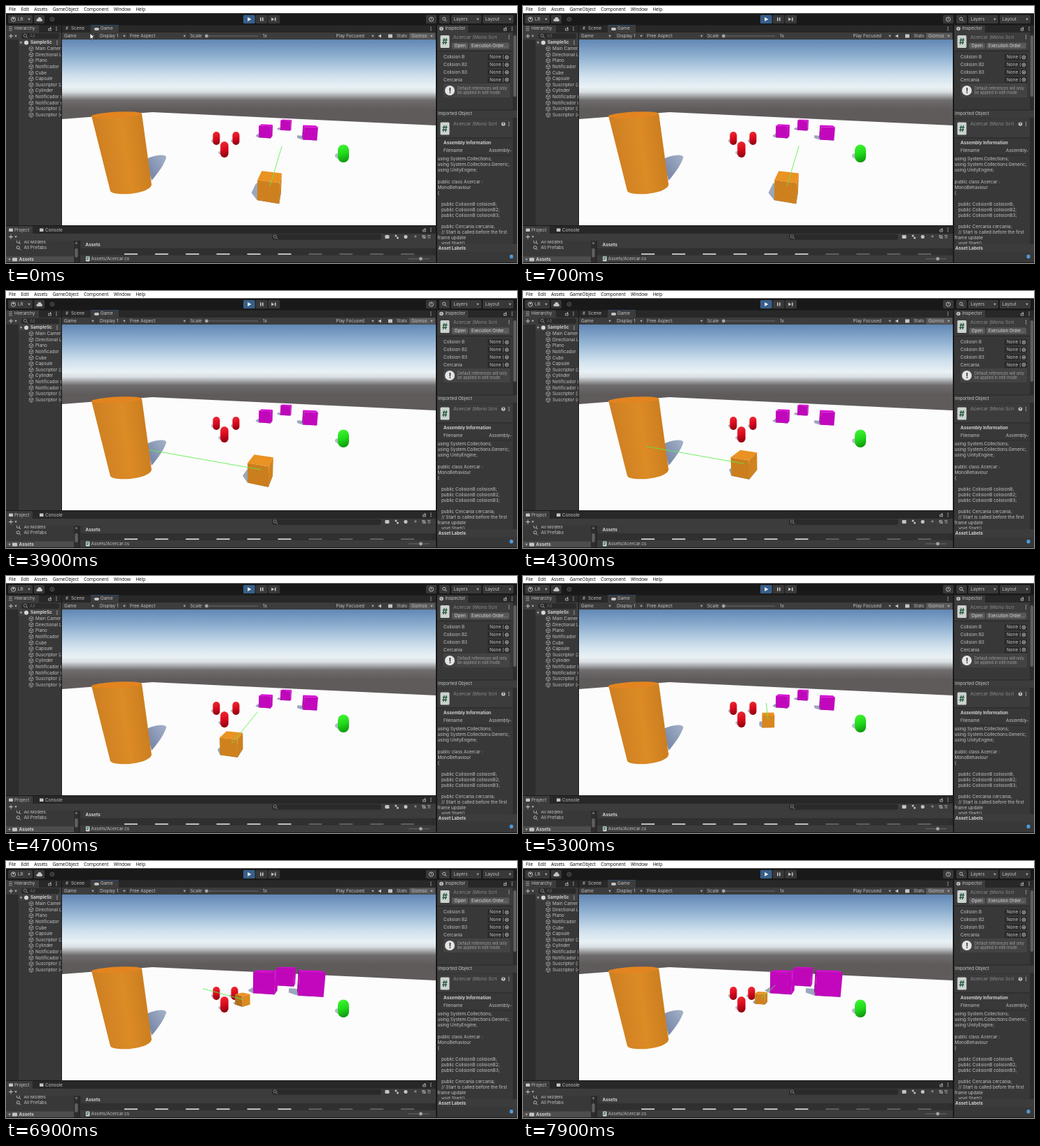
An HTML page with a canvas that plays this animation: 730x368 px, repeating every 8000 ms.

```html
<!DOCTYPE html>
<html lang="en">
<head>
<meta charset="utf-8">
<style>
  html, body { margin: 0; width: 100%; height: 100%; overflow: hidden; background: #191919; }
  canvas { display: block; }
</style>
</head>
<body>
<canvas width="730" height="368"></canvas>
<script>
const ctx = document.querySelector('canvas').getContext('2d');
const LOOP = 8000, STEP = 100;
const TEXT = '#c4c4c4', DIM = '#8d8d8d', PANEL = '#383838', BAR = '#3c3c3c', STRIP = '#282828', FIELD = '#2a2a2a', GAP = '#191919';

// ---------- drawing helpers ----------
function rect(color, x, y, w, h) {
  ctx.fillStyle = color;
  ctx.fillRect(x, y, w, h);
}
function pill(color, x, y, w, h, r = 1.5) {
  ctx.fillStyle = color;
  ctx.beginPath();
  ctx.roundRect(x, y, w, h, r);
  ctx.fill();
}
function text(str, x, y, color = TEXT, size = 6.4, weight = 400, family = 'Inter') {
  ctx.font = `${weight} ${size}px ${family}, sans-serif`;
  ctx.fillStyle = color;
  ctx.fillText(str, x, y);
}
const bold = (str, x, y) => text(str, x, y, '#d2d2d2', 6.3, 700);
function poly(color, points) {
  ctx.fillStyle = color;
  ctx.beginPath();
  points.forEach(p => ctx.lineTo(...p));
  ctx.fill();
}
function line(color, x1, y1, x2, y2, width = 1) {
  ctx.strokeStyle = color;
  ctx.lineWidth = width;
  ctx.beginPath();
  ctx.moveTo(x1, y1);
  ctx.lineTo(x2, y2);
  ctx.stroke();
}
function dot(color, x, y, r) {
  ctx.fillStyle = color;
  ctx.beginPath();
  ctx.arc(x, y, r, 0, 7);
  ctx.fill();
}
function ring(x, y, r, color = TEXT) {
  ctx.strokeStyle = color;
  ctx.lineWidth = 0.9;
  ctx.beginPath();
  ctx.arc(x, y, r, 0, 7);
  ctx.stroke();
}
function gradient(x1, y1, x2, y2, stops) {
  const g = ctx.createLinearGradient(x1, y1, x2, y2);
  stops.forEach(([at, color]) => g.addColorStop(at, color));
  return g;
}
function triangle(x, y, r, angle, color = TEXT) {
  poly(color, [0, 1, 2].map(i => angle + i * Math.PI * 2 / 3).map(a => [x + r * Math.cos(a), y + r * Math.sin(a)]));
}
const caret = (x, y) => triangle(x, y - 0.3, 2, Math.PI / 2, '#b0b0b0');
const kebab = (x, y) => [-2.3, 0, 2.3].forEach(d => dot(TEXT, x, y + d, 0.7));
function plus(x, y) {
  line(TEXT, x - 3, y, x + 3, y);
  line(TEXT, x, y - 3, x, y + 3);
  caret(x + 7, y);
}
function lens(x, y, color = TEXT) {
  ring(x - 0.7, y - 0.7, 2.1, color);
  line(color, x + 1, y + 1, x + 3, y + 3);
}
function lock(x, y) {
  ctx.strokeStyle = TEXT;
  ctx.lineWidth = 0.8;
  ctx.strokeRect(x - 1.7, y - 0.3, 3.4, 2.8);
  line(TEXT, x + 1.2, y, x + 1.2, y - 2.5);
}
function cubeIcon(x, y) {
  const corner = i => [x + 3.3 * Math.sin(i * Math.PI / 3), y - 3.3 * Math.cos(i * Math.PI / 3)];
  ctx.strokeStyle = '#b5b5b5';
  ctx.lineWidth = 0.7;
  ctx.beginPath();
  for (let i = 0; i <= 6; i++) ctx.lineTo(...corner(i));
  for (let i = 1; i < 6; i += 2) { ctx.moveTo(x, y); ctx.lineTo(...corner(i)); }
  ctx.stroke();
}
function scriptIcon(x, y) {
  pill('#ccd3cf', x, y, 13, 18);
  text('#', x + 2.6, y + 9.5, '#23553c', 12, 700);
}
function slider(x, y, w, knob) {
  line('#6a6a6a', x, y, x + w, y);
  dot('#a5a5a5', x + knob, y, 2.4);
}
function dropdown(label, x, w) {
  pill(PANEL, x, 13, w, 12);
  text(label, x + 3.5, 19);
  caret(x + w - 5, 19);
}

// ---------- 3D scene ----------
const CAM = { x: 347, y: 181, focal: 230, height: 4.47, cos: 0.982, sin: 0.188 };
const LIGHT = [0.32, 0.77, -0.56];

function project([x, y, z]) {
  const drop = CAM.height - y;
  const k = CAM.focal / (z * CAM.cos + drop * CAM.sin);
  return [CAM.x + x * k, CAM.y + (drop * CAM.cos - z * CAM.sin) * k];
}
const shadowOf = ([x, y, z]) => project([x - y * 0.25, 0, z + y * 0.6]);
const dotProduct = (a, b) => a.reduce((sum, v, i) => sum + v * b[i], 0);

function cube(rgb, x, z, size, yaw) {
  const half = size / 2, c = Math.cos(yaw) * half, s = Math.sin(yaw) * half;
  const axes = [[c, 0, -s], [0, half, 0], [s, 0, c]];
  const centre = [x, half, z], eye = [0, CAM.height, 0];
  const faces = [0, 1, 2].flatMap(a => [-1, 1].map(sign => {
    const normal = axes[a].map(v => v * sign), u = axes[(a + 1) % 3], v = axes[(a + 2) % 3];
    const middle = centre.map((p, i) => p + normal[i]);
    const corners = [[-1, -1], [1, -1], [1, 1], [-1, 1]].map(([p, q]) => middle.map((m, i) => m + p * u[i] + q * v[i]));
    return { normal, middle, corners };
  }));
  for (const f of faces) poly('#9aa7bd', f.corners.map(shadowOf));
  for (const { normal, middle, corners } of faces) {
    if (dotProduct(normal, eye.map((e, i) => e - middle[i])) <= 0) continue;
    const shade = 0.7 + 0.38 * Math.max(0, dotProduct(normal, LIGHT) / half);
    poly(`rgb(${rgb.map(v => v * shade)})`, corners.map(project));
  }
}
function capsule(x, top, w, h, light, mid, dark) {
  ctx.lineCap = 'round';
  line('#b3bccb', x - 1, top + h - w / 3, x - w * 0.55, top + h - w * 0.6, w * 0.4);
  ctx.lineCap = 'butt';
  pill(gradient(x - w * 0.3, top, x + w * 0.3, top + h, [[0, light], [0.5, mid], [1, dark]]), x - w / 2, top, w, h, w / 2);
}
function cylinder() {
  ctx.fillStyle = gradient(205, 235, 230, 218, [[0, '#7c8bab'], [1, '#a3b1c8']]);
  ctx.beginPath();
  ctx.moveTo(200, 219);
  ctx.bezierCurveTo(213, 213, 229, 211, 229, 217);
  ctx.quadraticCurveTo(225, 230, 208, 250);
  ctx.fill();
  ctx.fillStyle = gradient(133, 215, 209, 205, [[0, '#cf8022'], [0.5, '#dc8b25'], [1, '#c87b1e']]);
  ctx.beginPath();
  ctx.moveTo(122, 157);
  ctx.lineTo(149, 265);
  ctx.bezierCurveTo(154, 273, 204, 270, 208, 256);
  ctx.lineTo(194, 154);
  ctx.fill();
  ctx.fillStyle = '#e2841f';
  ctx.beginPath();
  ctx.ellipse(158, 156, 36, 4.4, -0.05, 0, 7);
  ctx.fill();
}

// The player alternately turns to a heading and walks straight ahead
const turn = (from, to, heading) => ({ from, to, heading });
const walk = (from, to, distance) => ({ from, to, distance });
const MOVES = [
  turn(2800, 3100, -1.227), walk(3800, 4300, 2.25),
  turn(4300, 4500, 0.248), walk(4500, 4700, 0.65), walk(4700, 5200, 4.65),
  turn(5200, 5450, -0.42), walk(5700, 6000, 1.92), turn(6000, 6200, 0.24),
  turn(6300, 6600, -1.3), turn(6800, 7100, 0.247), walk(7200, 7600, 0.6)
];
const ramp = (t, from, to) => Math.min(1, Math.max(0, (t - from) / (to - from)));

function poseAt(t) {
  let x = 1, z = 7.05, heading = 0.275;
  for (const move of MOVES) {
    const k = ramp(t, move.from, move.to);
    if (move.distance) {
      x += Math.sin(heading) * move.distance * k;
      z += Math.cos(heading) * move.distance * k;
    } else {
      heading += (move.heading - heading) * k;
    }
  }
  return { x, z, heading };
}

function scene(t) {
  rect(gradient(0, 48, 0, 148, [[0, '#6187b4'], [0.27, '#95b5d4'], [0.52, '#cfe0ec'], [0.68, '#e9f1f5'],
    [0.75, '#d8dee1'], [0.81, '#a3a5a7'], [0.87, '#6f6c6d'], [1, '#605b5b']]), 80, 48, 534, 266);
  poly('#fcfcfc', [[80, 162], [209, 152], [614, 171], [614, 314], [80, 314]]);
  cylinder();

  const scale = 1 + 0.77 * ramp(t, 6500, 6900);
  const magenta = [222, 8, 216];
  cube(magenta, 6, 25.8, 1.55 * scale, 0.35);
  cube(magenta, 2.18, 20.4, 1.5 * scale, 0.3);
  cube(magenta, 7.4, 19.25, 1.55 * scale, 0.25);

  const red = ['#f02a35', '#d80a1c', '#85000f'];
  capsule(300.5, 180, 10, 19, ...red);
  capsule(328.5 - 2 * ramp(t, 6600, 6700), 180, 10, 19, ...red);
  capsule(312, 194, 11.5, 23, ...red);
  capsule(482, 198.5, 16, 25.5, '#42f535', '#20da1a', '#0c8f0c');

  const { x, z, heading } = poseAt(t), reach = 7.4;
  cube([236, 147, 34], x, z, 1, heading);
  const tip = project([x + reach * Math.sin(heading), 0.5, z + reach * Math.cos(heading)]);
  line('rgba(88,240,72,.85)', ...project([x, 0.5, z]), ...tip);
}

// ---------- editor panels ----------
function topBars() {
  rect('#fff', 0, 0, 730, 10.5);
  let x = 4;
  for (const name of ['File', 'Edit', 'Assets', 'GameObject', 'Component', 'Window', 'Help']) {
    text(name, x, 5.5, '#000', 6.4, 500, 'Open Sans');
    x += ctx.measureText(name).width + 7.4;
  }
  rect(GAP, 0, 10.5, 730, 17);
  dropdown('', 3, 35);
  ring(10.5, 19, 3.2);
  dot(TEXT, 10.5, 18, 1.3);
  text('LR', 17, 19);
  pill(PANEL, 40, 13, 15, 12);
  pill(TEXT, 43.5, 18.5, 8.5, 3.5, 1.7);
  dot(TEXT, 48, 18.5, 2.6);
  ring(66, 19, 2.8, '#666');
  dot('#666', 66, 19, 1);
  ['#375f8a', PANEL, PANEL].forEach((color, i) => pill(color, 339 + i * 17.7, 13, 16.7, 12));
  triangle(347, 19, 3.5, 0, '#eee');
  rect(TEXT, 363, 16.5, 1.6, 5);
  rect(TEXT, 366, 16.5, 1.6, 5);
  triangle(380.5, 19, 2.8, 0);
  rect(TEXT, 384, 16.5, 1.5, 5);
  pill(PANEL, 600, 13, 15, 12);
  ring(607.5, 19, 3);
  line(TEXT, 607.5, 17, 607.5, 19.5, 0.8);
  pill(PANEL, 619, 13, 15, 12);
  lens(626.5, 19);
  dropdown('Layers', 636, 43);
  dropdown('Layout', 681, 44);
}

const OBJECTS = ['Main Camera', 'Directional Light', 'Plano', 'Notificador', 'Cube', 'Capsule', 'Suscriptor (2)', 'Cylinder',
  'Notificador (2)', 'Notificador (3)', 'Suscriptor (3)', 'Suscriptor (4)'];

function hierarchy() {
  rect(PANEL, 0, 27, 80, 287);
  rect(STRIP, 0, 27, 80, 11);
  rect(BAR, 0, 27, 47, 11);
  rect(BAR, 0, 38, 80, 10);
  [30, 32.5, 35].forEach(y => line(TEXT, 4, y, 9, y, 0.7));
  text('Hierarchy', 12, 32.5);
  lock(62.5, 32.5);
  kebab(72, 32.5);
  plus(7, 43);
  pill(FIELD, 22, 39, 54, 8, 3);
  lens(28, 43, DIM);
  text('All', 34, 43, '#666');
  rect('#2d2d2d', 0, 48, 18, 266);
  rect('#404040', 18, 48, 62, 8.5);
  caret(21.5, 52.5);
  dot('#d8d8d8', 29, 52.5, 3);
  bold('SampleSc', 35, 52.5);
  kebab(73, 52.5);
  OBJECTS.forEach((name, i) => {
    const y = 61.2 + i * 8.62;
    cubeIcon(36, y);
    text(name, 42, y);
  });
  rect(GAP, 79, 27, 1.2, 287);
}

function gameBar() {
  rect(STRIP, 80, 27, 534, 11);
  rect(BAR, 121, 27, 40, 11);
  rect('#3a79bb', 121, 27, 40, 1);
  rect(BAR, 80, 38, 534, 10);
  text('#', 85, 32.5);
  text('Scene', 93, 32.5);
  pill(TEXT, 126, 31, 7, 4, 2);
  text('Game', 135, 32.5);
  kebab(607, 32.5);
  const label = (name, x, caretX) => {
    text(name, x, 43);
    if (!caretX) return;
    caret(caretX, 43);
    rect('#2b2b2b', caretX + 4.5, 38, 0.8, 10);
  };
  label('Game', 83, 124);
  label('Display 1', 134, 169);
  label('Free Aspect', 177, 255);
  label('Scale', 263);
  label('1x', 367);
  label('Play Focused', 471.5, 524);
  label('Stats', 558);
  slider(286, 43, 74, 0.5);
  triangle(534.5, 43, 3, Math.PI);
  rect(TEXT, 546, 40.5, 6, 5);
  rect('#585858', 576, 38.5, 37, 9);
  label('Gizmos', 579);
  caret(608, 43);
}

const CODE = `using System.Collections;
using System.Collections.Generic;
using UnityEngine;

public class Acercar :
MonoBehaviour
{

   public ColisionB colisionB;
   public ColisionB colisionB2;
   public ColisionB colisionB3;

   public Cercania cercania;
   // Start is called before the first
frame update
   void Start()`.split('\n');

function scriptHeader(y) {
  rect(BAR, 616, y, 108, 26);
  scriptIcon(620.5, y + 4);
  text('Acercar (Mono Scri', 639, y + 6.5, DIM, 6.8);
  kebab(718.5, y + 6.5);
}
function inspector() {
  rect(GAP, 614, 27, 2, 341);
  rect(PANEL, 616, 27, 114, 341);
  rect(STRIP, 616, 27, 114, 11);
  rect(BAR, 616, 27, 44, 11);
  dot(TEXT, 622, 32.5, 2.8);
  text('i', 621.2, 32.5, '#222', 5, 700);
  text('Inspector', 627.5, 32.5);
  lock(713, 32.5);
  kebab(723, 32.5);

  scriptHeader(38);
  pill('#585858', 637, 52.5, 23, 9);
  text('Open', 640.5, 57, '#ddd');
  pill('#585858', 662, 52.5, 57, 9);
  text('Execution Order...', 665, 57, '#ddd', 6.1);
  ['Colision B', 'Colision B2', 'Colision B3', 'Cercania'].forEach((name, i) => {
    const y = 73.5 + i * 10.7;
    text(name, 625, y);
    pill(FIELD, 688, y - 4.3, 32, 8.6);
    text('None (', 691, y);
    ring(715.5, y, 2.4);
    dot(TEXT, 715.5, y, 1);
  });
  pill('#434343', 625, 111, 95, 20);
  dot('#e4e4e4', 634, 121, 7);
  text('!', 632.4, 121.2, '#333', 11, 700);
  text('Default references will only', 645, 118.3, '#a0a0a0', 5.5);
  text('be applied in edit mode.', 645, 124.8, '#a0a0a0', 5.5);
  rect('#2d2d2d', 724, 38, 6, 303);
  pill('#5f5f5f', 724.7, 42, 4.3, 88, 2);

  rect(BAR, 616, 149.5, 114, 10.5);
  text('Imported Object', 617, 154.5);
  scriptHeader(162.5);
  dot(TEXT, 710.5, 169, 2.8);
  text('?', 709, 169.3, '#222', 5, 700);
  [64, 148.5, 188.5].forEach(y => rect('#242424', 616, y, 108, 0.8));
  bold('Assembly Information', 625, 196.3);
  text('Filename', 625, 206.7);
  text('Assembly-', 690, 206.7);
  rect('#2b2b2b', 616, 213.5, 108, 0.8);
  CODE.forEach((s, i) => text(s, 616.5, 219.3 + i * 8.08));
  rect(BAR, 616, 341, 114, 11);
  bold('Asset Labels', 617.5, 346.8);
  rect(PANEL, 616, 352, 114, 15);
  pill('#4c9bdc', 719.5, 356, 5, 5.5, 2);
}

function projectPanel() {
  rect(PANEL, 0, 314, 614, 54);
  rect(GAP, 0, 314, 614, 1.2);
  rect(STRIP, 0, 315, 614, 11);
  rect(BAR, 0, 315, 38, 11);
  rect(BAR, 0, 326, 614, 10);
  pill(TEXT, 4, 318.5, 6, 4.5, 1);
  text('Project', 12, 321);
  rect(TEXT, 48, 318.5, 5.5, 4.5);
  text('Console', 56, 321);
  lock(597.5, 320.5);
  kebab(607, 320.5);
  ['All Models', 'All Prefabs'].forEach((name, i) => {
    lens(18, 338 + i * 8.5);
    text(name, 25.5, 338 + i * 8.5);
  });
  rect(BAR, 0, 326, 97, 10);
  plus(7, 330.5);
  rect('#4d4d4d', 0, 358.5, 97, 8.5);
  caret(5, 363);
  pill(TEXT, 9, 360.5, 7, 5, 1);
  bold('Assets', 18.5, 363);
  rect('#2d2d2d', 97, 336, 7, 31);
  triangle(100.5, 339.5, 2, -Math.PI / 2, '#888');
  pill('#5f5f5f', 98.3, 347, 4.4, 13, 2);
  rect(GAP, 104.5, 336, 1, 31);
  rect(BAR, 110, 336.5, 504, 10);
  bold('Assets', 113.5, 341.8);
  rect('#303030', 106, 347, 508, 10);
  for (let i = 0; i < 10; i++) rect(i < 6 ? '#e6e6e6' : '#6d6d6d', 169 + i * 43.9, 354.5, 19, 1.6);
  rect('#2d2d2d', 608, 347, 6, 10);
  rect(BAR, 106, 357, 508, 10);
  pill('#d8dedb', 114, 358.5, 5.5, 7, 1);
  text('#', 114.6, 362, '#23704a', 6, 700);
  text('Assets/Acercar.cs', 121.5, 362.2);
  slider(575, 362, 30, 17.5);
  pill(FIELD, 380, 326.8, 156, 8, 3);
  lens(385, 330.7, DIM);
  pill(TEXT, 541.5, 328, 6, 5, 1);
  dot(TEXT, 557, 329, 1.5);
  dot(TEXT, 559.5, 332, 1.5);
  pill(TEXT, 568.5, 328, 5, 5, 2);
  text('★', 582, 330.7, DIM, 6.5, 400, 'DejaVu Sans');
  ring(597, 330.5, 2);
  line(TEXT, 594, 328, 600, 333, 0.8);
  text('11', 601.5, 330.7);
  rect(GAP, 0, 367, 730, 1);
}

function cursor(t) {
  if (t >= 700) return;
  const k = ramp(t, 0, 600);
  ctx.save();
  ctx.translate(120 + 514 * k, 39 + 306 * k);
  poly('#fff', [[0, 0], [0, 8.5], [2, 6.7], [3.3, 9.5], [4.6, 8.9], [3.4, 6.2], [6, 6]]);
  ctx.closePath();
  ctx.strokeStyle = '#111';
  ctx.lineWidth = 0.7;
  ctx.stroke();
  ctx.restore();
}

function frame(now) {
  const t = Math.floor(now % LOOP / STEP) * STEP;
  ctx.textBaseline = 'middle';
  hierarchy();
  scene(t);
  gameBar();
  inspector();
  projectPanel();
  topBars();
  cursor(t);
  requestAnimationFrame(frame);
}
requestAnimationFrame(frame);
</script>
</body>
</html>
```
